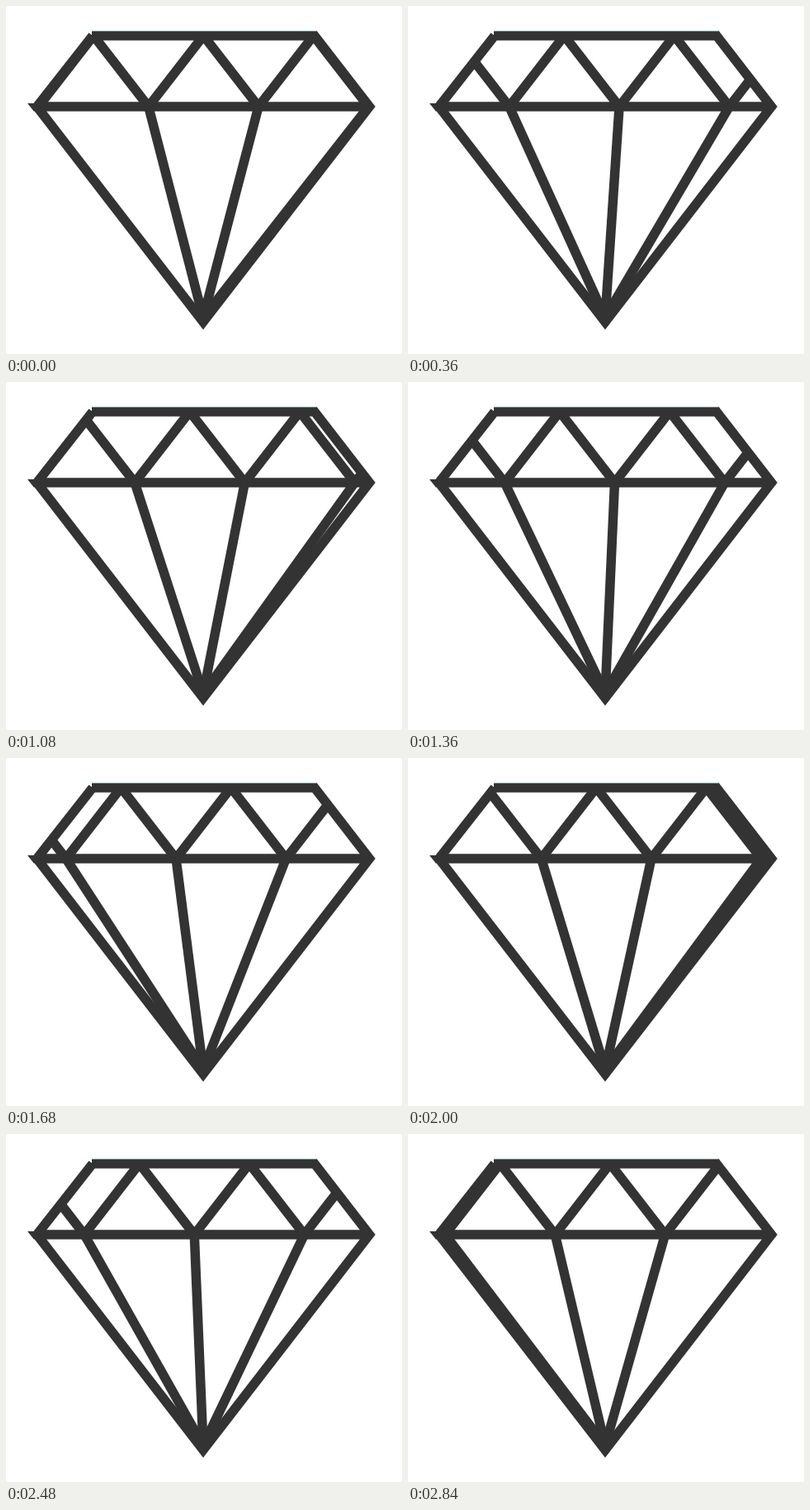
An HTML page with a canvas that plays this animation: 480x422 px, repeating every 2880 ms.

```html
<!DOCTYPE html>
<html lang="en">
<head>
<meta charset="utf-8">
<title>Turning diamond</title>
<style>
html, body { margin: 0; width: 100%; height: 100%; overflow: hidden; background: #fff; }
canvas { display: block; }
</style>
</head>
<body>
<canvas id="stage" width="480" height="422"></canvas>
<script>
const ctx = document.getElementById('stage').getContext('2d');
const INK = '#333', LINE = 11.5;
const LOOP = 2880, STEP = 40;
const TURN = 960;           // ms to travel one facet
const FACET = 400 / 3;
const TOP = 36, GIRDLE = 122, FOCUS = 378;
const CENTER = 239, HALF_TABLE = 134, HALF_GIRDLE = 201.5;

const corner = (half, y) => [CENTER + half, y];
const LEFT = corner(-HALF_GIRDLE, GIRDLE);
const RIGHT = corner(HALF_GIRDLE, GIRDLE);
const OUTLINE = [
  corner(-HALF_TABLE, TOP), LEFT, [CENTER, 383], RIGHT,
  corner(HALF_TABLE + 1, TOP), [104, TOP]
];

function trace(points) {
  ctx.beginPath();
  points.forEach(([x, y]) => ctx.lineTo(x, y));
}

function stroke(points, join) {
  ctx.lineJoin = join;
  trace(points);
  ctx.stroke();
}

function drawFacets(shift) {
  ctx.save();
  trace(OUTLINE);
  ctx.clip();
  const zigzag = [];
  for (let i = -1; i < 5; i++) {
    const x = 39.4 + i * FACET - shift;
    zigzag.push([x, GIRDLE], [x + FACET / 2, TOP]);
    if (x > LEFT[0] + 4 && x < RIGHT[0]) stroke([[x, GIRDLE], [CENTER, FOCUS]], 'bevel');
  }
  stroke(zigzag, 'bevel');
  ctx.restore();
}

function drawFrame() {
  stroke([LEFT, RIGHT], 'miter');
  stroke(OUTLINE, 'miter');
  // small spur left of the girdle
  trace([[26, 118], [42, 118], [34, 128]]);
  ctx.fill();
  ctx.fillStyle = '#6a9c9c';
  ctx.fillRect(104, 30, 272, 1);
}

function draw(now) {
  const t = Math.floor((now % LOOP) / STEP) * STEP;
  ctx.fillStyle = '#fff';
  ctx.fillRect(0, 0, 480, 422);
  ctx.fillStyle = ctx.strokeStyle = INK;
  ctx.lineWidth = LINE;
  drawFacets((t % TURN) / TURN * FACET);
  drawFrame();
}

let start;
function tick(now) {
  start ??= now;
  draw(now - start);
  requestAnimationFrame(tick);
}
draw(0);
requestAnimationFrame(tick);
</script>
</body>
</html>
```
